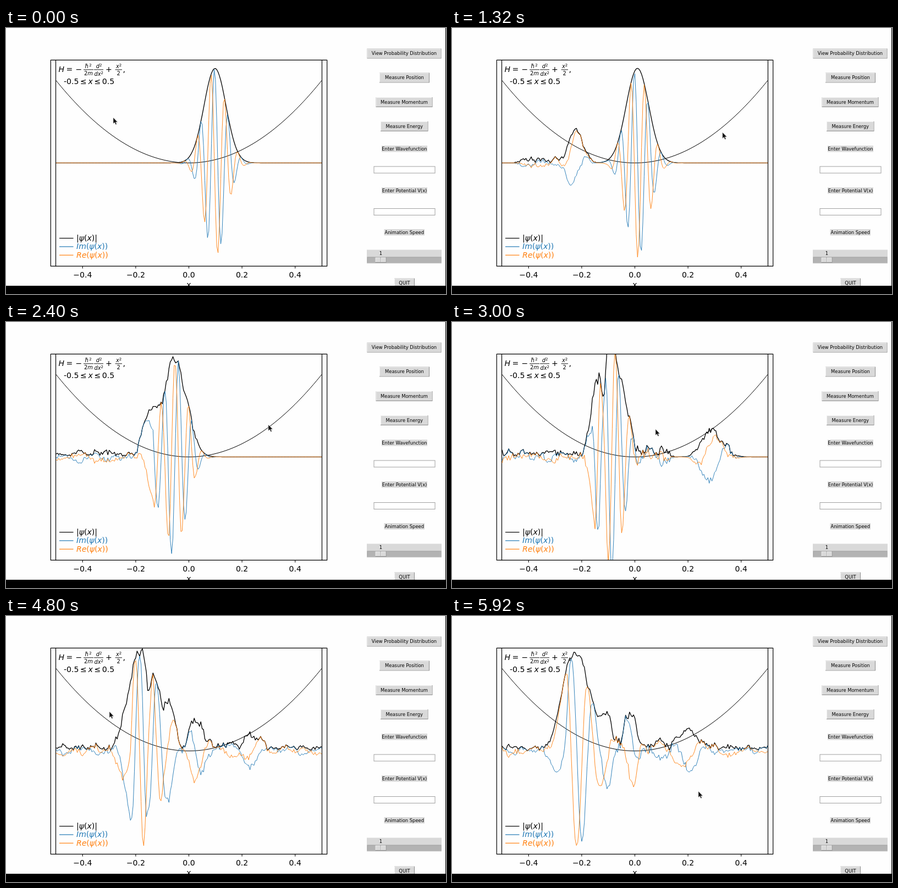
These frames come from a looping animation (800x484 px, 6000 ms). An HTML page:

```html
<!DOCTYPE html>
<html lang="en">
<head>
<meta charset="utf-8">
<title>Wave packet in a harmonic potential</title>
<style>
  html, body { margin: 0; width: 100%; height: 100%; overflow: hidden; background: #fefefe; }
  svg { display: block; width: 800px; height: 484px; }
  text { font-family: "DejaVu Sans", sans-serif; font-size: 14px; }
  .i { font-style: italic; }
  .frac text { font-size: 9.8px; text-anchor: middle; }
  .frac .sup { font-size: 6.9px; font-style: normal; }
  .mid { text-anchor: middle; }
  .ui text { font-size: 8.4px; text-anchor: middle; }
  .line { fill: none; stroke: #000; stroke-linejoin: round; }
</style>
</head>
<body>
<svg viewBox="0 0 800 484">
  <defs><clipPath id="axes"><rect x="81" y="58" width="503" height="375"/></clipPath></defs>

  <g clip-path="url(#axes)">
    <path class="line" d="M90.5 58V433M574.5 58V433" stroke-width="1.2"/>
    <path id="well" class="line" stroke-width="1"/>
    <polyline id="abs" class="line" stroke-width="1.3"/>
    <polyline id="im" class="line" stroke-width="0.9" style="stroke:#1f77b4"/>
    <polyline id="re" class="line" stroke-width="0.9" style="stroke:#ff7f0e"/>
  </g>
  <rect class="line" x="81.3" y="58.3" width="502.4" height="375" stroke-width="1.2"/>
  <g id="ticks"></g>
  <text class="mid" x="332.5" y="472">x</text>

  <text class="i" x="95.5" y="80">H</text>
  <text x="109.5" y="80">=</text>
  <text x="126.5" y="80">−</text>
  <g class="frac">
    <text class="i" x="149.5" y="73">ħ<tspan class="sup" dx="1" dy="-3">2</tspan></text>
    <text x="150" y="86">2<tspan class="i">m</tspan></text>
    <text class="i" x="169" y="73">d<tspan class="sup" dy="-3">2</tspan></text>
    <text class="i" x="168.7" y="86.5">dx<tspan class="sup" dy="-3">2</tspan></text>
    <text class="i" x="205" y="73">x<tspan class="sup" dy="-3">2</tspan></text>
    <text x="204.5" y="86">2</text>
  </g>
  <path class="line" d="M141 75.8H159M160 75.8H177M198.5 75.8H211" stroke-width="0.9"/>
  <text x="181" y="80">+</text>
  <text x="212.5" y="80">,</text>
  <text x="105" y="102">-0.5</text>
  <text x="135" y="102">≤</text>
  <text class="i" x="149.5" y="102">x</text>
  <text x="160.5" y="102">≤</text>
  <text x="174.8" y="102">0.5</text>

  <g id="legend"></g>
  <g id="panel" class="ui"></g>
  <path id="mouse" d="M0 0V11L2.6 8.7L4.4 12.8L6.2 12L4.5 8.2H7.8Z" fill="#111" stroke="#ddd" stroke-width="0.5"/>
  <path d="M0 469H799V0H800V484H0Z"/>
</svg>

<script>
const $ = id => document.getElementById(id);
const lerp = (a, b, k) => a + (b - a) * k;
const clamp = (v, lo, hi) => Math.min(hi, Math.max(lo, v));
const ramp = (a, b, v) => clamp((v - a) / (b - a), 0, 1);
const smooth = (a, b, v) => { const k = ramp(a, b, v); return k * k * (3 - 2 * k); };
const bell = (d, w) => Math.exp(-d * d / (2 * w * w));
const LEFT = 91, RIGHT = 574, ZERO = 245.5, N = 200;

// key points: seconds, then two values
function track(points, t) {
  let i = 0;
  while (i < points.length - 2 && t >= points[i + 1][0]) i++;
  const [a, b] = [points[i], points[i + 1]], k = ramp(a[0], b[0], t);
  return [lerp(a[1], b[1], k), lerp(a[2], b[2], k)];
}

const mousePath = [[0, 195, 163], [0.4, 192, 180], [0.8, 243, 199], [1.33, 492, 190], [1.8, 465, 174],
  [2.45, 478, 188], [3, 370, 195], [3.87, 286, 229], [4.8, 188, 174], [5.93, 448, 319]];

// each disturbance starts a ripple that runs outwards
const kicks = [{ x: 188, t: 0.45 }, { x: 477, t: 2.45 }];

// slow lumps beside the main packet: seconds, center, height
const lumps = [
  { w: 12, path: [[0.45, 188, 0], [0.8, 188, 48], [1.8, 258, 82], [3, 263, 60], [3.87, 240, 15], [5.93, 202, 40]] },
  { w: 18, path: [[2.45, 477, 0], [3, 477, 44], [3.87, 475, 30], [5.93, 428, 25]] },
  { w: 11, path: [[3, 337, 0], [3.87, 337, 72], [4.8, 345, 66], [5.93, 322, 78]] },
  { w: 13, path: [[3.87, 300, 0], [4.8, 296, 62], [5.93, 281, 50]] }
];

function hash(a, b) {
  const s = Math.sin(a * 127.1 + b * 311.7) * 43758.5453;
  return (s - Math.floor(s)) * 2 - 1;
}
function noise(u, v) {
  const i = Math.floor(u), j = Math.floor(v), k = u - i, m = v - j;
  return lerp(lerp(hash(i, j), hash(i + 1, j), k), lerp(hash(i, j + 1), hash(i + 1, j + 1), k), m);
}

// cycles counted from a crest that drifts left; waves lengthen away from it
function cycles(x, t) {
  const d = x - 348 + 17 * t;
  const length = 24.7 + 17 * (t / 6) ** 4;
  const mid = lerp(1 / 24.7, 1 / 65, smooth(2.5, 4.8, t));
  return clamp(d, -40, 20) / length + clamp(d - 20, 0, 90) * mid
    + Math.max(d - 110, 0) / 90 + Math.min(d + 40, 0) / 130;
}

function height(x, t) {
  const center = 380 - 34 * t + 1.45 * t * t;
  let h = (172 + 35 * Math.exp(-((t - 3.6) ** 2))) * bell(x - center, 20 + 0.4 * t);
  for (const { w, path } of lumps) {
    const [at, top] = track(path, t);
    h += top * bell(x - at, w);
  }
  const notch = 0.45 * ramp(2.3, 3, t) * ramp(5.8, 4.6, t);
  return h * (1 - notch * bell(x - 275 + 8.5 * (t - 3), 3.5));
}

function roughness(x, t) {
  const reach = Math.max(...kicks.map(k => ramp(0, 15, 85 * (t - k.t) - Math.abs(x - k.x))));
  return reach * (0.55 + 0.6 * smooth(1.5, 3.8, t) * bell(x - 320, 85));
}

function drawWave(t) {
  const abs = [], re = [], im = [];
  for (let i = 0; i <= N; i++) {
    const x = lerp(LEFT, RIGHT, i / N);
    const h = height(x, t), phase = 2 * Math.PI * cycles(x, t), rough = roughness(x, t);
    const jag = seed => rough * (9 * noise(i + seed, t * 7) + 18 * noise(i / 5 + seed, t * 4));
    const u = h * Math.cos(phase) + jag(0), v = h * Math.sin(phase) + jag(700);
    const put = (list, y) => list.push(x.toFixed(1) + "," + (ZERO - y).toFixed(1));
    put(abs, Math.hypot(u, v));
    put(re, u);
    put(im, v);
  }
  $("abs").setAttribute("points", abs.join(" "));
  $("re").setAttribute("points", re.join(" "));
  $("im").setAttribute("points", im.join(" "));
  $("mouse").setAttribute("transform", `translate(${track(mousePath, t)})`);
}

// static parts
const rect = (x, y, w, h, fill) => `<rect x="${x}" y="${y}" width="${w}" height="${h}" fill="${fill}"/>`;
const label = (x, y, s) => `<text x="${x}" y="${y}">${s}</text>`;
const raised = (x, y, w, h) =>
  rect(x, y, w, h, "#8c8c8c") + rect(x, y, w - 1, h - 1, "#f2f2f2") + rect(x + 1, y + 1, w - 2, h - 2, "#d9d9d9");
const button = (x, y, w, s) => raised(x, y, w, 18) + label(x + w / 2, y + 11.8, s);
const caption = (x, y, w, s) => rect(x, y, w, 11.5, "#d9d9d9") + label(x + w / 2, y + 8.6, s);
const entry = y => rect(668.5, y, 112, 13, "#a0a0a0") + rect(669.5, y + 1, 110, 11, "#fff");

$("panel").innerHTML =
  button(656.5, 37.5, 135, "View Probability Distribution") +
  button(679, 81.5, 91, "Measure Position") +
  button(672.5, 126, 103, "Measure Momentum") +
  button(681, 170, 86.5, "Measure Energy") +
  caption(683, 214, 83, "Enter Wavefunction") + entry(251.5) +
  caption(683, 290, 83, "Enter Potential V(x)") + entry(328) +
  caption(687.5, 366, 73.5, "Animation Speed") +
  rect(656, 403.5, 136, 25, "#d9d9d9") + label(681.5, 413, "1") +
  rect(656.5, 416.5, 135, 11, "#a0a0a0") + rect(657.5, 417.5, 133.5, 9.5, "#b3b3b3") +
  raised(671.5, 417.5, 10, 9.5) + raised(681.5, 417.5, 10, 9.5) +
  button(706, 455.5, 37, "QUIT");

$("ticks").innerHTML = ["−0.4", "−0.2", "0.0", "0.2", "0.4"].map((s, i) => {
  const x = 139.3 + i * 96.6;
  return `<path class="line" d="M${x} 433v4.5" stroke-width="1.1"/><text class="mid" x="${x}" y="454">${s}</text>`;
}).join("");

$("legend").innerHTML = [["", "#000"], ["Im", "#1f77b4"], ["Re", "#ff7f0e"]].map(([s, c], i) => {
  const y = 382.5 + i * 15.4;
  const psi = `<tspan class="i">ψ</tspan>(<tspan class="i">x</tspan>)`;
  const body = s ? `<tspan class="i">${s}</tspan>(${psi})` : `|${psi}|`;
  return `<path d="M97 ${y}H122.5" stroke="${c}" stroke-width="1.2"/><text x="128" y="${y + 4.5}" fill="${c}">${body}</text>`;
}).join("");

let curve = "";
for (let x = LEFT; x <= RIGHT; x += 3)
  curve += (curve ? "L" : "M") + x + " " + (ZERO - 150 * ((x - 332.5) / 241.5) ** 2).toFixed(2);
$("well").setAttribute("d", curve);

// three pictures every 200 ms, held for 80, 40 and 80 ms
const start = performance.now();
let shown = -1;
function tick() {
  const ms = Math.max(0, performance.now() - start) % 6000, r = ms % 200;
  const step = 3 * Math.floor(ms / 200) + (r < 80 ? 0 : r < 120 ? 1 : 2);
  if (step !== shown) drawWave((shown = step) / 15);
  requestAnimationFrame(tick);
}
tick();
</script>
</body>
</html>
```
